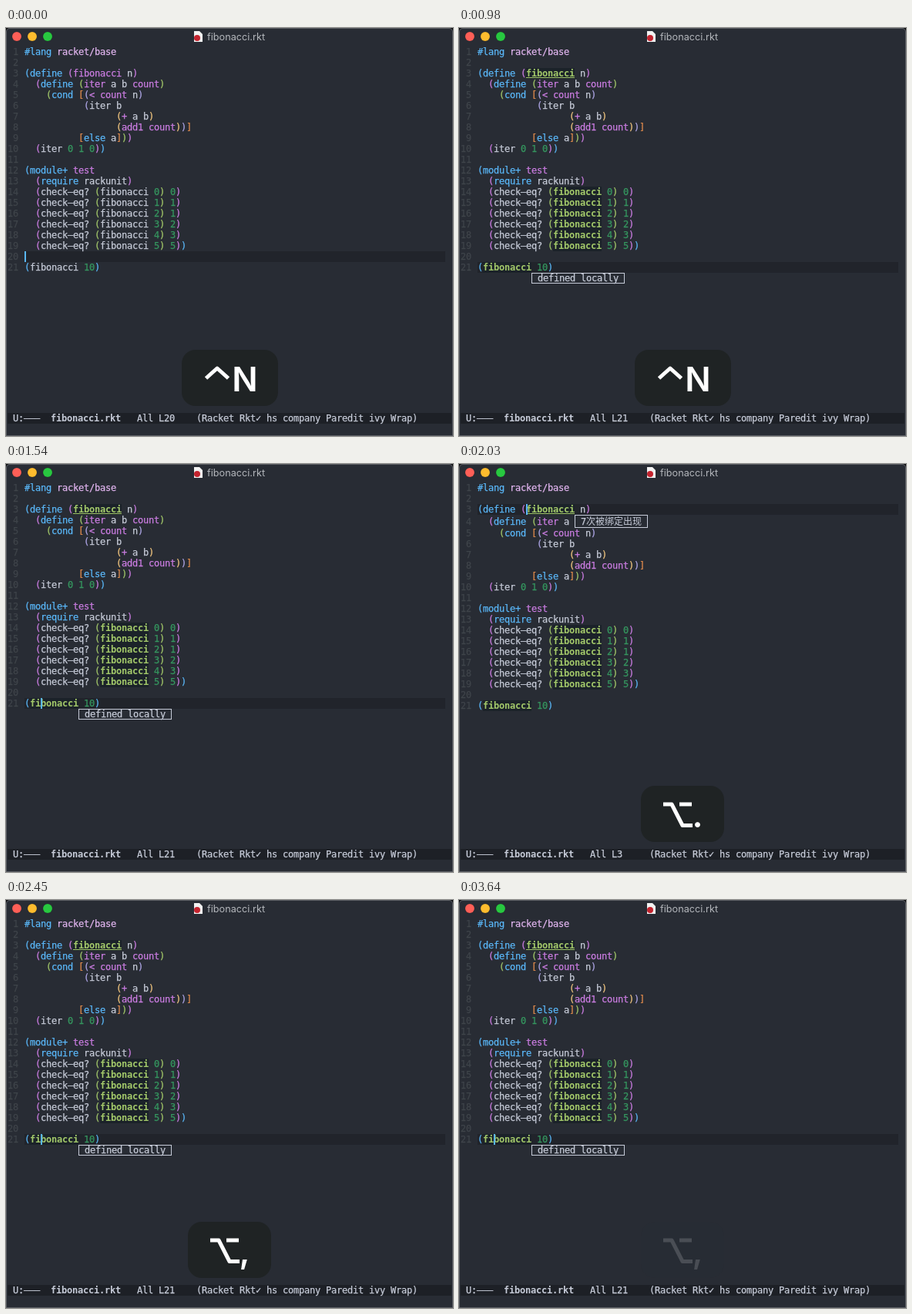
Animation of 580 by 530 pixels, one loop 3.71 s. Source, as an HTML page with a canvas:

```html
<!DOCTYPE html>
<html lang="en">
<head>
<meta charset="utf-8">
<title>fibonacci.rkt</title>
<style>
html, body { margin: 0; width: 100%; height: 100%; overflow: hidden; background: #282c34; }
canvas { display: block; }
</style>
</head>
<body>
<canvas id="stage" width="580" height="530"></canvas>
<script>
const ctx = document.getElementById("stage").getContext("2d");

const LOOP = 3710, TICK = 70;
const CELL = 7, ROW = 14, LEFT = 24, TOP = 24;
const MONO = '"DejaVu Sans Mono", monospace';
const C = {
  bg: "#282c34", line: "#21242b", bar: "#1d2026", match: "#1b2229",
  text: "#c6cbd8", dim: "#3f444a", blue: "#5ab7f8", magenta: "#cb7de2",
  lang: "#e0b4ee", number: "#35965f", green: "#a3c96a", key: "#1f2324"
};
const DEPTHS = [C.blue, C.magenta, C.green, "#e28c4c", "#afa7e8", "#f2c67f"];
const KEYWORDS = ["#lang", "define", "cond", "else", "module+", "require"];
const BUILTINS = ["<", "+", "add1", "count", "test"];
const NAME = "fibonacci";

const SOURCE = `#lang racket/base

(define (fibonacci n)
  (define (iter a b count)
    (cond [(< count n)
           (iter b
                 (+ a b)
                 (add1 count))]
          [else a]))
  (iter 0 1 0))

(module+ test
  (require rackunit)
  (check-eq? (fibonacci 0) 0)
  (check-eq? (fibonacci 1) 1)
  (check-eq? (fibonacci 2) 1)
  (check-eq? (fibonacci 3) 2)
  (check-eq? (fibonacci 4) 3)
  (check-eq? (fibonacci 5) 5))

(fibonacci 10)`;

function wordColor(word, before) {
  if (KEYWORDS.includes(word)) return C.blue;
  if (BUILTINS.includes(word) || before.endsWith("define (")) return C.magenta;
  if (word === "racket/base") return C.lang;
  return /^\d+$/.test(word) ? C.number : C.text;
}

function tokenize(source) {
  let depth = 0;
  return source.split("\n").map(line =>
    [...line.matchAll(/[()[\]]|[^\s()[\]]+/g)].map(({ 0: text, index: col }) => {
      let color;
      if ("([".includes(text)) color = DEPTHS[depth++];
      else if (")]".includes(text)) color = DEPTHS[--depth];
      else color = wordColor(text, line.slice(0, col));
      return { text, col, color };
    }));
}

const lines = tokenize(SOURCE);

function rect(x, y, w, h, color) {
  ctx.fillStyle = color;
  ctx.fillRect(x, y, w, h);
}

function round(x, y, w, h, r, color) {
  ctx.fillStyle = color;
  ctx.beginPath();
  ctx.roundRect(x, y, w, h, r);
  ctx.fill();
}

function disc(x, y, r, color) {
  ctx.fillStyle = color;
  ctx.beginPath();
  ctx.arc(x, y, r, 0, Math.PI * 2);
  ctx.fill();
}

function stroke(points) {
  ctx.beginPath();
  points.forEach(([x, y]) => ctx.lineTo(x, y));
  ctx.stroke();
}

// Monospaced text on whole-pixel cells; y is the top of the row.
// A hairline outline gives the weight of smoothed screen type.
function cells(text, x, y, color, bold = false) {
  ctx.font = `${bold ? "bold " : ""}12px ${MONO}`;
  ctx.textAlign = "left";
  ctx.fillStyle = ctx.strokeStyle = color;
  ctx.lineWidth = 0.25;
  [...text.replaceAll("-", "–")].forEach((ch, i) => {
    ctx.fillText(ch, x + i * CELL, y + 11);
    if (!bold) ctx.strokeText(ch, x + i * CELL, y + 11);
  });
}

function stateAt(t) {
  const away = t >= 1680 && t < 2380;
  const row = t < 210 ? 19 : away ? 2 : 20;
  const col = t < 280 ? 0 : away ? 9 : 3;
  return {
    row, col,
    marked: t >= 350,
    local: (t >= 350 && t < 1680) || t >= 2450,
    bound: t >= 1820 && t < 2380,
    cursor: !(t >= 770 && t < 1260) && !(t >= 3010 && t < 3500),
    key: t < 1610 ? "N" : t < 2380 ? "." : ",",
    keyAlpha: t < 1610 ? fade(t, 1250) : fade(t, 3430)
  };
}

function fade(t, start) {
  return Math.min(1, Math.max(0, 1 - (t - start) / 250));
}

function drawWindow() {
  rect(0, 0, 580, 530, "#0c0d0f");
  round(0, 0, 580, 530, [5, 5, 0, 0], "#5b5e64");
  round(1, 1, 578, 528, [4, 4, 0, 0], C.bg);
  ["#ff5f57", "#febc2e", "#28c840"].forEach((color, i) => {
    disc(14 + 20 * i, 11, 6, color);
    ctx.strokeStyle = "rgba(0, 0, 0, 0.12)";
    ctx.lineWidth = 0.8;
    ctx.stroke();
  });

  ctx.fillStyle = "#f2f2f2";
  ctx.beginPath();
  [[244, 4], [251, 4], [255, 8], [255, 18], [244, 18]].forEach(([x, y]) => ctx.lineTo(x, y));
  ctx.fill();
  disc(248, 13, 4, "#c3232e");

  ctx.font = "12.7px Inter, sans-serif";
  ctx.textAlign = "left";
  ctx.fillStyle = "#b4b7bc";
  ctx.fillText("fibonacci.rkt", 261, 16);
}

function drawCode(s) {
  // The taller popup glyphs stretch the fourth row by 3px.
  const rowTop = i => TOP + ROW * i + (s.bound ? (i === 3 ? 2 : i > 3 ? 3 : 0) : 0);
  rect(LEFT, rowTop(s.row), 546, ROW, C.line);

  lines.forEach((tokens, i) => {
    const y = rowTop(i);
    cells(String(i + 1).padStart(2), 2, y, C.dim);
    for (const { text, col, color } of tokens) {
      if (s.bound && i === 3 && col >= 18) continue;
      const x = LEFT + col * CELL;
      const hit = s.marked && text === NAME;
      if (hit) rect(x, y, text.length * CELL, ROW, C.match);
      cells(text, x, y, hit ? C.green : color, hit);
      if (hit && i === 2) rect(x, y + 12, text.length * CELL, 1, C.green);
    }
  });

  if (s.cursor) rect(LEFT + s.col * CELL, rowTop(s.row), 2, ROW, C.blue);
}

function popupBox(x, y, w, h) {
  rect(x, y, w, h, C.text);
  rect(x + 1, y + 1, w - 2, h - 2, C.bg);
}

function drawPopup(s) {
  if (s.local) {
    popupBox(94, 318, 121, ROW);
    cells("defined locally", 102, 318, C.text);
  }
  if (s.bound) {
    popupBox(150, 66, 95, 17);
    cells("7", 158, 68, C.text);
    ctx.font = '12px "Noto Sans CJK SC", "Noto Sans CJK", sans-serif';
    ctx.fillText("次被绑定出现", 165, 79);
  }
}

function drawModeLine(s) {
  rect(2, 500, 576, ROW, C.bar);
  cells("U:---", 9, 500, C.text);
  cells("fibonacci.rkt", 58, 500, C.text, true);
  cells(`All L${s.row + 1}`, 170, 500, C.text);
  cells("(Racket Rkt✓ hs company Paredit ivy Wrap)", 247, 500, C.text);
}

function drawKey({ key, keyAlpha }) {
  const control = key === "N";
  ctx.save();
  // The dark plate melts into the background sooner than its glyphs.
  ctx.globalAlpha = keyAlpha ** 2;
  if (control) round(228, 418, 125, 73, 18, C.key);
  else round(236, 418, 108, 73, 18, C.key);

  ctx.globalAlpha = keyAlpha;
  ctx.strokeStyle = ctx.fillStyle = "#fff";
  ctx.lineWidth = 5;
  ctx.lineJoin = "round";
  if (control) {
    stroke([[259.5, 455], [274, 442], [288.5, 455]]);
  } else {
    stroke([[265, 442], [276, 442], [290, 469.5], [303, 469.5]]);
    stroke([[286, 442], [302, 442]]);
  }
  ctx.font = "600 44px Inter, sans-serif";
  ctx.textAlign = "center";
  ctx.fillText(key, control ? 310 : 309.5, 472);
  ctx.restore();
}

function draw(now) {
  const t = Math.floor((now % LOOP) / TICK) * TICK;
  const state = stateAt(t);
  drawWindow();
  drawCode(state);
  drawPopup(state);
  drawModeLine(state);
  drawKey(state);
}

const start = performance.now();
function loop() {
  draw(performance.now() - start);
  requestAnimationFrame(loop);
}
loop();
</script>
</body>
</html>
```
